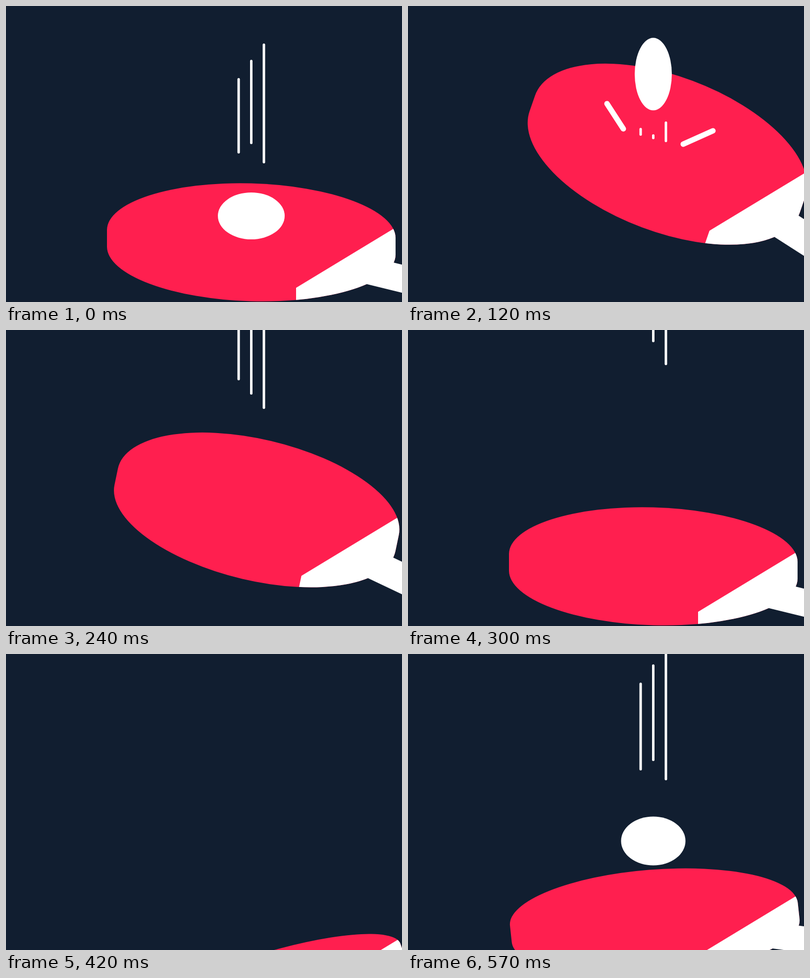
These frames come from a looping animation (800x600 px, 600 ms). An HTML page with a canvas:

```html
<!DOCTYPE html>
<html lang="en">
<head>
<meta charset="utf-8">
<title>Ball and bat</title>
<style>
html, body { margin: 0; width: 100%; height: 100%; overflow: hidden; background: #111e30; }
canvas { display: block; }
</style>
</head>
<body>
<canvas id="stage" width="800" height="600"></canvas>
<script>
const ctx = document.getElementById('stage').getContext('2d');
const LOOP = 600, STEP = 30;
const NAVY = '#111e30', RED = '#ff1f4f', WHITE = '#fff';

function line(x1, y1, x2, y2, width) {
  ctx.lineWidth = width;
  ctx.beginPath();
  ctx.moveTo(x1, y1);
  ctx.lineTo(x2, y2);
  ctx.stroke();
}

function polygon(points) {
  ctx.beginPath();
  points.forEach(([x, y]) => ctx.lineTo(x, y));
  ctx.fill();
}

// Outline of a thick disc: two half ellipses joined by short straight sides.
function discPath(cx, cy, angle, height) {
  const width = 291.5, skew = 8, thick = 33.5;
  ctx.beginPath();
  for (const half of [0, 1]) {
    ctx.save();
    ctx.translate(cx, cy);
    ctx.rotate(angle);
    ctx.transform(width, skew, 0, Math.sqrt(height * height - skew * skew), 0, (0.5 - half) * thick);
    ctx.arc(0, 0, 1, half * Math.PI, (half + 1) * Math.PI);
    ctx.restore();
  }
  ctx.closePath();
}

// s is the swing of the bat, from -1 (low) to 1 (high).
function drawBat(s) {
  const q = s * s, angle = s * Math.PI / 9;

  const grip = angle + 0.24, dx = Math.cos(grip), dy = Math.sin(grip);
  const upper = [783 - 8.5 * s + 19 * q, 520 - 98 * s];
  const lower = [730 - 3 * s + 14 * q, 564 - 104 * s + 3 * q];
  const along = ([x, y], d) => [x + d * dx, y + d * dy];

  ctx.save();
  discPath(495.5 + 31.5 * q, 479 - 205 * s + 18 * q, angle, 103 + 39.5 * s);
  ctx.fillStyle = RED;
  ctx.fill();
  ctx.clip();
  const slope = 0.608, level = 927.5 - 123.3 * s + 17.3 * q;
  const x = 586 + 9 * s + 16 * q, y = level - slope * x;
  ctx.fillStyle = WHITE;
  polygon([
    [x, y], [900, level - slope * 900], [900, 900],
    [x - 200 * Math.sin(angle), y + 200 * Math.cos(angle)]
  ]);
  ctx.restore();

  ctx.fillStyle = WHITE;
  polygon([along(upper, -20), along(upper, 200), along(lower, 200), along(lower, -20)]);
}

function drawSparks(t, s) {
  if (t <= 0 || t >= 210) return;
  const k = (s - 0.588) / 0.363;
  const grow = Math.min(1, (t / 60) ** 0.7);
  const fade = Math.max(0, (t - 120) / 90);
  const spark = (ix, iy, ox, oy) => {
    const at = f => [ix + (ox - ix) * f, iy + (oy - iy) * f];
    line(...at(fade), ...at(grow), 11);
  };
  spark(435, 332 - 83 * k, 409 - 7 * k, 299 - 101 * k);
  spark(547 + 9 * k, 350 - 70 * k, 584 + 32 * k, 326 - 73 * k);
}

const streak = (i, top, bottom) => {
  if (bottom > top) line(470 + 25.5 * i, top + 2.5, 470 + 25.5 * i, bottom - 2.5, 5);
};

function drawStreaks(t) {
  // falling
  const k = (t < 300 ? t + 30 : t - 570) / 30;
  if (k > -4 && k < 2.7) {
    [[58, 236], [21, 217], [-12, 256]].forEach(([top, bottom], i) =>
      streak(i, top + 94 * k - 6 * k * k, bottom + 69 * k - 6 * k * k));
  }
  // rising
  if (t >= 115 && t < 360) {
    const u = Math.max(0, t - 120);
    [[247, 263, 161], [260, 270, 139], [234, 276, 116]].forEach(([top, bottom, rise], i) =>
      streak(i, top - 2.8 * u, bottom - rise * (u / 120) ** 1.4));
  }
}

function drawBall(t) {
  let drop, rx, ry;
  if (t < 300) {
    const k = Math.min(2, t / 60);
    drop = 120 * (t / 60) ** 1.26;
    rx = 67.5 - 23 * k + 4 * k * k;
    ry = 47.5 + 5 * k + 4 * k * k;
  } else {
    const u = LOOP - t, k = Math.min(1, u / 120) ** 1.85;
    drop = 46.5 * (u / 30) ** 1.5;
    rx = 67.5 - 31.5 * k;
    ry = 47.5 + 27.5 * k;
  }
  ctx.beginPath();
  ctx.ellipse(495.5, 425.5 - drop, rx, ry, 0, 0, 2 * Math.PI);
  ctx.fill();
}

function draw(now) {
  const t = Math.floor((now + 2) / STEP) * STEP % LOOP;
  const s = Math.sin(2 * Math.PI * t / LOOP);
  ctx.fillStyle = NAVY;
  ctx.fillRect(0, 0, 800, 600);
  ctx.strokeStyle = WHITE;
  ctx.lineCap = 'round';
  drawBat(s);
  drawSparks(t, s);
  drawStreaks(t);
  drawBall(t);
  requestAnimationFrame(draw);
}
requestAnimationFrame(draw);
</script>
</body>
</html>
```
